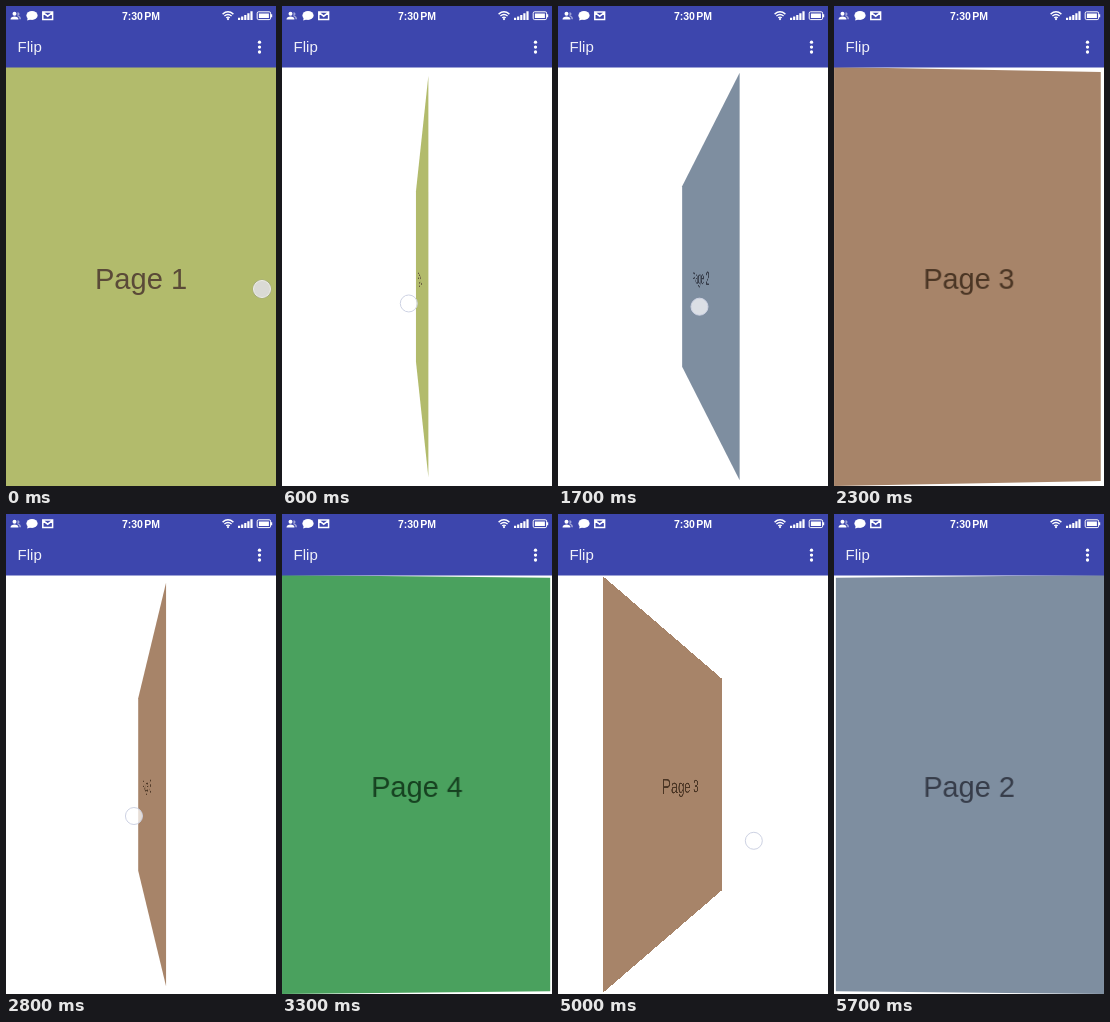
Write an HTML page that moves like this. It is 270 px wide and 480 px high and loops after 5.8 s.

```html
<!DOCTYPE html>
<html lang="en">
<head>
<meta charset="utf-8">
<title>Flip</title>
<style>
  html, body { margin: 0; width: 100%; height: 100%; overflow: hidden; background: #fff; }
  #stage { position: relative; width: 270px; height: 480px; overflow: hidden; background: #fff;
    font-family: "Liberation Sans", Arial, sans-serif; }
  #bar { position: absolute; left: 0; top: 0; width: 270px; height: 61.5px; }
  #pager { position: absolute; left: 0; top: 61px; width: 270px; height: 419px; overflow: hidden; }
  .page { position: absolute; inset: 0; font-size: 29.1px; line-height: 34px; text-align: center;
    box-sizing: border-box; padding-top: 195px; white-space: nowrap; }
  #touch { position: absolute; left: -9px; top: -9px; width: 18px; height: 18px; box-sizing: border-box;
    border: 1.3px solid #cdd2e3; border-radius: 50%; background: rgba(255, 255, 255, .72); }
  #touch.down { border-color: #efefe8; background: #dadad5; box-shadow: 0 0 0 .6px #a3a884; }
</style>
</head>
<body>
<div id="stage">
  <div id="pager"></div>
  <svg id="bar" viewBox="0 0 270 61.5" fill="#fff">
    <rect width="270" height="61.5" fill="#3d46ad"/>
    <circle cx="8.5" cy="7.8" r="2"/>
    <path d="M4.5 13.6c0-2.6 2-3.2 4-3.2s4 .6 4 3.2z"/>
    <path d="M11.5 6.2a1.8 1.8 0 0 1 .4 3.6c2 .3 3.1 1.2 3.1 3.4h-1.6c0-1.7-.8-2.5-2-3z" opacity=".5"/>
    <ellipse cx="26" cy="9.4" rx="5.6" ry="4.5"/>
    <path d="M21.8 11l-.6 3.6 4-1.4z"/>
    <path d="M36.8 6h9.8v7.4h-9.8zM37 6.6l4.7 3.6 4.7-3.6" fill="none" stroke="#fff" stroke-width="1.5"/>
    <text x="135" y="13.7" font-size="10.5" font-weight="700" text-anchor="middle" word-spacing="-1.5">7:30 PM</text>
    <path d="M216.6 8.1q5.4-4.6 10.8 0M218.4 10q3.6-3 7.2 0M220.2 11.8q1.8-1.4 3.6 0"
      fill="none" stroke="#fff" stroke-width="1.4"/>
    <circle cx="222" cy="13.1" r="1.1"/>
    <path d="M232 14v-2.2h2.2V14zM235.1 14v-3.6h2.2V14zM238.2 14V9h2.2v5zM241.3 14V7.2h2.2V14zM244.4 14V5.2h2.2V14z"/>
    <rect x="251.2" y="5.8" width="13.4" height="7.8" rx="1.4" fill="none" stroke="#fff"/>
    <path d="M252.9 7.4h10v4.6h-10zM264.8 8.2h1.4v3h-1.4z"/>
    <text x="11.6" y="46.4" font-size="15" opacity=".92">Flip</text>
    <circle cx="253.5" cy="36.2" r="1.65"/>
    <circle cx="253.5" cy="41.1" r="1.65"/>
    <circle cx="253.5" cy="46" r="1.65"/>
  </svg>
  <div id="touch"></div>
</div>
<script>
const LOOP = 5800, STEP = 100, WIDTH = 270, DEPTH = 333, LAG = 39;

const pages = [
  ['#b2bb6c', '#5a4a38'],
  ['#7e8ea0', '#363c49'],
  ['#a78469', '#4a3524'],
  ['#4aa15e', '#164120']
].map(([back, ink], i) => {
  const el = document.createElement('div');
  el.className = 'page';
  el.textContent = 'Page ' + (i + 1);
  el.style.background = back;
  el.style.color = ink;
  document.getElementById('pager').append(el);
  return el;
});
const touch = document.getElementById('touch');

// Each swipe: finger down, finger up, settle time, first page, direction, finger path
const swipes = [
  { down: 0,    up: 740,  settle: 600, page: 0, dir: 1,  from: [256, 283], to: [122, 298] },
  { down: 1330, up: 1970, settle: 600, page: 1, dir: 1,  from: [250, 290], to: [118, 303] },
  { down: 2430, up: 2940, settle: 600, page: 2, dir: 1,  from: [250, 290], to: [118, 303] },
  { down: 3480, up: 4020, settle: 450, page: 3, dir: -1, from: [106, 312], to: [239, 298] },
  { down: 4780, up: 5340, settle: 600, page: 2, dir: -1, from: [115, 335], to: [243, 322] }
];

const mix = (a, b, k) => a + (b - a) * k;

function stateAt(t) {
  const s = swipes.filter(w => w.down <= t).pop();
  const span = s.to[0] - s.from[0];
  const reach = Math.abs(span) / WIDTH;
  if (t < s.up) {
    const u = (t - s.down) / (s.up - s.down);
    const k = 1 - (1 - u) ** 2;
    const speed = 2 * (1 - u) * span / (s.up - s.down);
    return {
      scroll: s.page + s.dir * reach * k,
      shift: u > 0 ? -LAG * speed : 0,
      finger: [mix(s.from[0], s.to[0], k), mix(s.from[1], s.to[1], k)],
      pressed: u === 0
    };
  }
  const left = Math.max(0, 1 - (t - s.up) / s.settle) ** 5;
  return { scroll: s.page + s.dir * (1 - (1 - reach) * left), shift: 0 };
}

function flip(el, pos, shift) {
  const shown = Math.abs(pos) < 0.5;
  el.style.visibility = shown ? 'visible' : 'hidden';
  if (!shown) return;
  const tilt = Math.abs(Math.sin(pos * Math.PI));
  const size = 1 - 0.405 * tilt - 0.025 * tilt ** 8;
  el.style.transform = Math.abs(pos) < 1e-6 ? 'none' :
    `translateX(${shift}px) scale(${size}) perspective(${DEPTH}px) rotateY(${pos * 180}deg)`;
}

function draw(t) {
  const { scroll, shift, finger, pressed } = stateAt(t);
  pages.forEach((el, i) => flip(el, i - scroll, shift));
  touch.style.visibility = finger ? 'visible' : 'hidden';
  if (finger) {
    touch.style.transform = `translate(${finger[0]}px, ${finger[1]}px)`;
    touch.className = pressed ? 'down' : '';
  }
}

const start = performance.now();
function tick() {
  const t = (performance.now() - start) % LOOP;
  draw(Math.floor(t / STEP) * STEP);
  requestAnimationFrame(tick);
}
tick();
</script>
</body>
</html>
```
